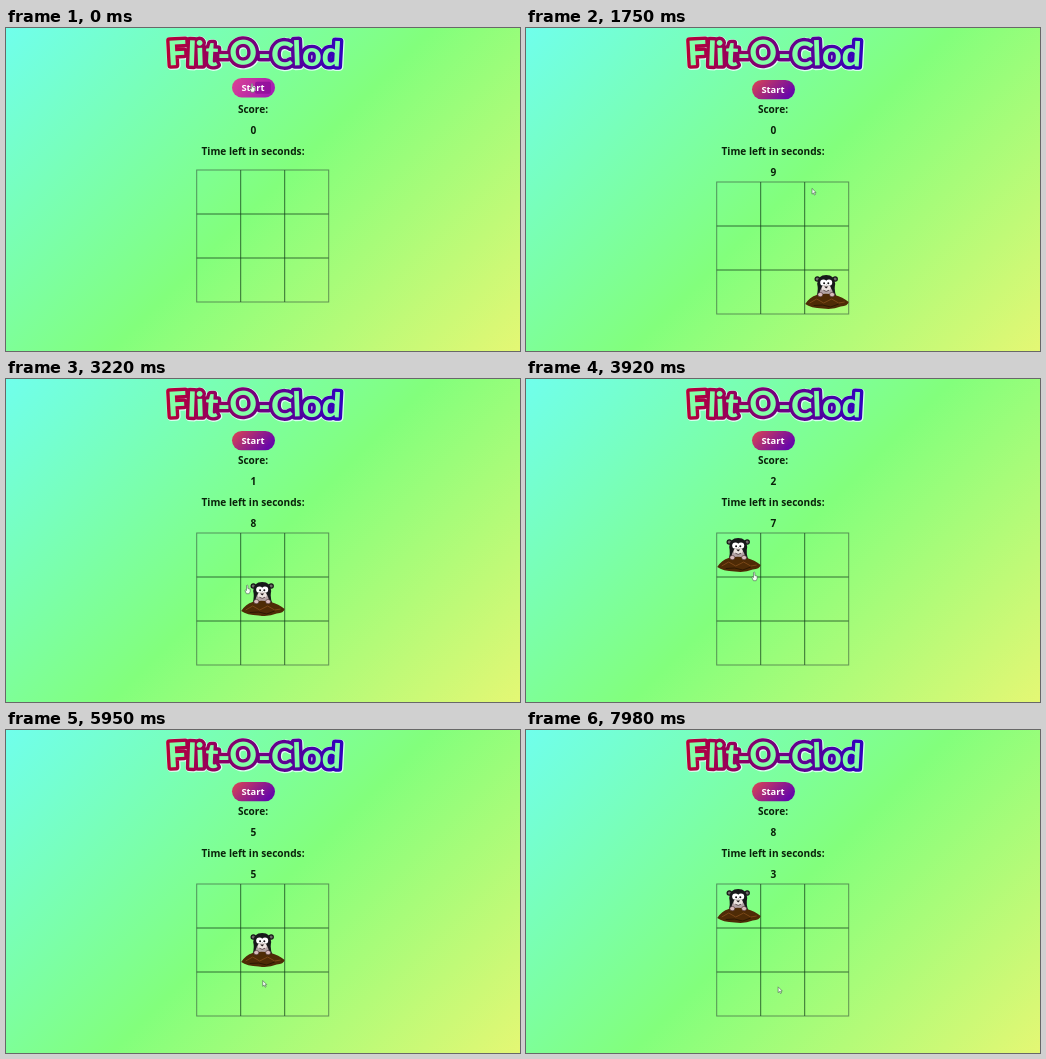
An HTML page that plays this animation: 514 by 323 pixels, repeating every 8000 ms.

```html
<!DOCTYPE html>
<html lang="en">
<head>
<meta charset="utf-8">
<title>Flit-O-Clod</title>
<style>
  html, body { margin: 0; width: 100%; height: 100%; overflow: hidden; }
  body { background: linear-gradient(135deg, #70ffec, #82ff7c 51%, #e4f774); }
  svg { display: block; width: 514px; height: 323px; }
  .label { font: 600 10.1px "Noto Sans", sans-serif; text-anchor: middle; fill: #0a220a; }
  .title { font: 800 34px Lato, sans-serif; text-anchor: middle; stroke-linejoin: round; }
</style>
</head>
<body>
<svg viewBox="0 0 514 323">
  <defs>
    <linearGradient id="ink" gradientUnits="userSpaceOnUse" x1="160" y1="0" x2="338" y2="0">
      <stop stop-color="#b80038"/><stop offset="1" stop-color="#3000c0"/>
    </linearGradient>
    <linearGradient id="idle" x1="0" y1="0" x2="1" y2=".45">
      <stop stop-color="#dc4652"/><stop offset="1" stop-color="#6a08a8"/>
    </linearGradient>
    <linearGradient id="hover" x1="0" y1="0" x2="1" y2=".3">
      <stop stop-color="#dc4592"/><stop offset="1" stop-color="#a81cb4"/>
    </linearGradient>
    <text id="name" class="title" x="248.5" y="37.5" rotate="-3 2 -2 3 0 -4 0 3 -2 2 3">Flit-O-Clod</text>
  </defs>

  <use href="#name" x=".4" y=".4" fill="none" stroke="#dcfff0" stroke-width="8.4"/>
  <use href="#name" fill="none" stroke="url(#ink)" stroke-width="6.8"/>
  <use href="#name" fill="#83ffa6"/>

  <g id="button">
    <rect id="pill" x="226" y="-9.7" width="43" height="19.4" rx="9.7"/>
    <rect id="press" x="249" y="-6" width="16" height="12" rx="2" fill="#8c0c98" opacity=".75"/>
    <text class="label" x="247" y="3.5" style="fill:#fff;font-size:9.4px">Start</text>
  </g>

  <g class="label">
    <text x="247" y="85.4">Score:</text>
    <text id="score" x="247.3" y="106"></text>
    <text x="247" y="127">Time left in seconds:</text>
    <text id="left" x="247.3" y="147.5"></text>
  </g>

  <g id="board">
    <path d="M44 0V132M88 0V132M0 44H132M0 88H132" stroke="#103c18" stroke-opacity=".75"/>
    <rect width="132" height="132" fill="none" stroke="#34503c" stroke-opacity=".62"/>
    <g id="mole">
      <g fill="#6f686a" stroke="#151717" stroke-width="1.2">
        <circle cx="12.6" cy="9" r="2.2"/><circle cx="30.4" cy="9" r="2.2"/>
      </g>
      <path d="M11.5 27Q14 21 12.5 14Q13 5 21.5 5T30.5 14Q29 21 32 27Z" fill="#17191a"/>
      <path d="M15 27Q14 20 18 17H25Q29 20 28 27Z" fill="#b3a3a5"/>
      <g fill="#fff"><circle cx="18.7" cy="12.6" r="3.2"/><circle cx="24.3" cy="12.6" r="3.2"/></g>
      <g fill="#111"><circle cx="19.4" cy="13.2" r="1"/><circle cx="23.6" cy="13.2" r="1"/></g>
      <ellipse cx="21.5" cy="18" rx="4.6" ry="3" fill="#ede4e0"/>
      <path d="M19.5 16.4H23.5L21.5 18.6Z" fill="#1b1415"/>
      <path d="M18.6 20.2Q21.5 22.4 24.4 20.2" fill="#fff" stroke="#3c2628" stroke-width=".8"/>
      <path d="M.5 34Q5 27 12 25Q21 22.5 30 25Q38 27 44 32Q43 36 36 36.5Q28 40 18 38.5Q6 38 .5 34Z" fill="#4e2b06"/>
      <path d="M5 33L12 29L19 33L27 29L34 33L40 32" fill="none" stroke="#7a4717"/>
      <path d="M9 35.5L18 35L26 37L34 34" fill="none" stroke="#2c1803"/>
      <g fill="#d9bcbc" stroke="#4b3034" stroke-width=".6">
        <ellipse cx="15.6" cy="24.6" rx="2.5" ry="2.2"/><ellipse cx="27.4" cy="24.6" rx="2.5" ry="2.2"/>
      </g>
    </g>
  </g>

  <g id="cursor" fill="#f4fff4" stroke="#46604c" stroke-width=".6" stroke-linejoin="round">
    <path id="arrow" d="M0 0V5.8L1.4 4.6L2.4 6.7L3.4 6.2L2.5 4.2H4.2Z"/>
    <path id="hand" d="M-.7 0Q0 -.8 .7 0V3L3 3.6V6L2 8.2H-.8L-2.3 5Q-1.5 4 -.7 5Z"/>
  </g>
</svg>
<script>
const LOOP = 8000, STEP = 70, CELL = 44, BOARD_X = 190.7;
const FIRST_TICK = 1610, FIRST_MOLE = 1310, MOLE_EVERY = 700;
const REACT = 300, HIT = 650; // delays after a mole appears
const moleCells = [8, 0, 4, 0, 4, 7, 4, 7, 7, 0];
const onStart = [246, 56], waiting = [278, 103];

const $ = id => document.getElementById(id);
const move = (id, x, y) => $(id).setAttribute("transform", `translate(${x} ${y})`);
const show = (id, on) => $(id).style.display = on ? "" : "none";
const corner = cell => [cell % 3 * CELL, Math.floor(cell / 3) * CELL];

function glide(from, to, t, start, end) {
  const p = Math.min(1, Math.max(0, (t - start) / (end - start)));
  const eased = p * p * (3 - 2 * p);
  return from.map((v, i) => v + (to[i] - v) * eased);
}

function aim(round) {
  if (round < 0) return waiting;
  const [x, y] = corner(moleCells[round]);
  return [BOARD_X + x + 22, 154 + y + 24];
}

function pointerAt(round, age, t) {
  if (round < 0) return glide(onStart, waiting, t, 560, 980);
  return glide(aim(round - 1), aim(round), age, REACT, HIT);
}

function draw(t) {
  const round = Math.floor((t - FIRST_MOLE) / MOLE_EVERY);
  const age = t - FIRST_MOLE - round * MOLE_EVERY;
  const ticking = t >= FIRST_TICK;
  const boardY = ticking ? 154 : 142;
  const [x, y] = pointerAt(round, age, t);
  const hovering = x < 269 && y < 70;

  // The first mole gets away; every later one is hit.
  $("score").textContent = Math.max(0, round - 1 + (age >= HIT));
  $("left").textContent = ticking ? 9 - Math.floor((t - FIRST_TICK) / 1000) : "";
  move("board", BOARD_X, boardY);
  move("button", 0, hovering ? 59.7 : ticking ? 61.6 : 60.6);
  $("pill").setAttribute("fill", `url(#${hovering ? "hover" : "idle"})`);
  show("press", hovering);

  show("mole", round >= 0);
  let onMole = false;
  if (round >= 0) {
    const [cx, cy] = corner(moleCells[round]);
    move("mole", cx, cy);
    const inside = d => d > 0 && d < CELL;
    onMole = inside(x - BOARD_X - cx) && inside(y - boardY - cy);
  }

  move("cursor", x, y);
  show("hand", hovering || onMole);
  show("arrow", !hovering && !onMole);
}

const start = performance.now();
function frame() {
  const t = (performance.now() - start) % LOOP;
  draw(Math.floor(t / STEP) * STEP);
  requestAnimationFrame(frame);
}
frame();
</script>
</body>
</html>
```
